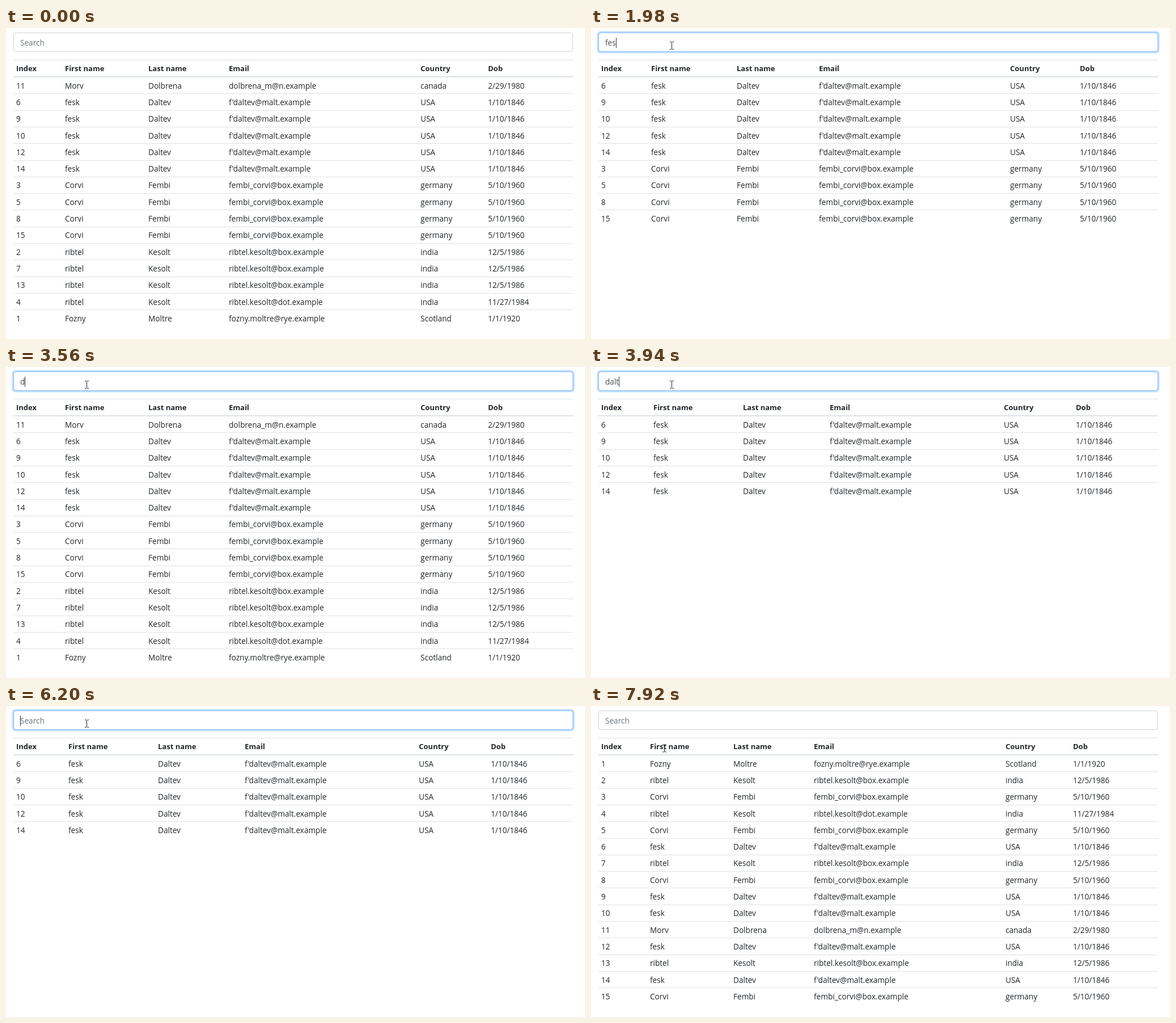
Write an HTML page that moves like this. It is 1021 px wide and 548 px high and loops after 8 s.

```html
<!DOCTYPE html>
<html lang="en">
<head>
<meta charset="utf-8">
<title>Searchable table</title>
<style>
  html, body { margin: 0; width: 100%; height: 100%; overflow: hidden; background: #fff; }
  svg { display: block; width: 100%; height: 100%; }
  text { font: 13.6px "Open Sans", "Noto Sans", sans-serif; fill: #212529; white-space: pre; }
  .head { font-weight: 700; font-size: 13px; }
  .line { fill: #dee2e6; }
  #placeholder { fill: #6c757d; }
  #query { fill: #495057; }
</style>
</head>
<body>
<svg viewBox="0 0 1021 548">
  <rect x="13.5" y="8.5" width="986" height="33" rx="3.5" fill="#fff" stroke="#ced4da"/>
  <g id="focus" fill="none">
    <rect x="12" y="7" width="989" height="36" rx="5" stroke="#bfdeff" stroke-width="3"/>
    <rect x="13.5" y="8.5" width="986" height="33" rx="3.5" stroke="#80bdff"/>
  </g>
  <rect id="selection" x="25" y="16" height="19" fill="#3390ff"/>
  <text id="placeholder" x="25" y="31">Search</text>
  <text id="query" x="25" y="31"></text>
  <rect id="caret" y="17" width="1" height="18" fill="#333"/>
  <g id="table"></g>
  <g id="cursor">
    <path id="arrow" d="M0 0V14.2L3.2 11.2L5.6 16.6L7.8 15.6L5.5 10.4H10Z" fill="#fff" stroke="#000"/>
    <path id="beam" d="M-3.5 -6.5H-1L0 -5.5L1 -6.5H3.5M0 -5.5V5.5M-3.5 6.5H-1L0 5.5L1 6.5H3.5" fill="none" stroke="#222"/>
  </g>
</svg>
<script>
const LOOP = 8000, STEP = 75, ROW = 29.3;
const $ = id => document.getElementById(id);

const headings = ['Index', 'First name', 'Last name', 'Email', 'Country', 'Dob'];
const people = [
  [[11], 'Morv', 'Dolbrena', 'dolbrena_m@n.example', 'canada', '2/29/1980'],
  [[6, 9, 10, 12, 14], 'fesk', 'Daltev', "f'daltev@malt.example", 'USA', '1/10/1846'],
  [[3, 5, 8, 15], 'Corvi', 'Fembi', 'fembi_corvi@box.example', 'germany', '5/10/1960'],
  [[2, 7, 13], 'ribtel', 'Kesolt', 'ribtel.kesolt@box.example', 'india', '12/5/1986'],
  [[4], 'ribtel', 'Kesolt', 'ribtel.kesolt@dot.example', 'india', '11/27/1984'],
  [[1], 'Fozny', 'Moltre', 'fozny.moltre@rye.example', 'Scotland', '1/1/1920']
];
const byLastName = people.flatMap(([ids, ...rest]) => ids.map(id => [id, ...rest]));
const byIndex = [...byLastName].sort((a, b) => a[0] - b[0]);

// Time, text in the field, filter in effect (it follows on key release), selected
const typing = [
  [0, '', ''],
  [1830, 'f', ''], [1905, 'fe', 'f'], [1980, 'fes', 'fe'], [2220, 'fesk', 'fesk'],
  [2770, 'fesk', 'fesk', true], [2845, '', 'fesk'], [2920, '', ''],
  [3560, 'd', ''], [3710, 'da', 'd'], [3790, 'dal', 'da'], [3870, 'dalt', 'dal'],
  [3950, 'dalte', 'dalt'], [4030, 'daltev', 'daltev'],
  [4490, 'daltev', 'daltev', true], [4565, '', 'daltev'], [4640, '', ''],
  [5040, 'u', ''], [5115, 'us', 'u'], [5190, 'usa', 'usa'],
  [5890, 'us', 'us'], [6060, 'u', 'u'], [6200, '', 'u'], [6290, '', '']
];
const caretOn = [[990, 1520], [1830, 3390], [3560, 5740], [6200, 6750]];
const FOCUS = 990, BLUR = 7145, SORT = 7220;

// Start time, number of steps, destination
const moves = [
  [120, 1, 550, 460], [190, 1, 547, 454], [360, 8, 142.5, 31], [6600, 1, 143.5, 31],
  [6750, 3, 63.5, 81.5], [7070, 1, 44.5, 84.5], [7540, 6, 129.5, 74.5]
];

const clamp = v => Math.max(0, Math.min(1, v));
const smooth = p => p * p * (3 - 2 * p);
const fade = (t, start) => smooth(clamp((t - start) / 150));
const show = (id, on) => $(id).setAttribute('visibility', on ? 'visible' : 'hidden');

function columns(count) {
  if (count > 9) return [18, 104, 251, 393, 731, 850];
  if (count > 5) return [18, 106, 257, 402, 739, 862];
  return [18, 110, 268, 421, 728, 855];
}

const line = (y, height = 1) =>
  `<rect class="line" x="13" y="${Math.round(y)}" width="987" height="${height}"/>`;

function tableMarkup(rows) {
  const xs = columns(rows.length);
  const cells = (row, y, cls) => row.map((value, i) =>
    `<text class="${cls}" x="${xs[i]}" y="${Math.round(y)}">${value}</text>`).join('');
  return line(56) + cells(headings, 76, 'head') + line(85, 2) +
    rows.map((row, i) => (i ? line(86 + ROW * i) : '') + cells(row, 106.6 + ROW * i, '')).join('');
}

let tableKey;
function drawTable(filter, sorted) {
  const key = filter + sorted;
  if (key === tableKey) return;
  tableKey = key;
  const rows = (sorted ? byIndex : byLastName)
    .filter(row => row.join(' ').toLowerCase().includes(filter));
  $('table').innerHTML = tableMarkup(rows);
}

function drawField(t, text, selected) {
  $('focus').setAttribute('opacity', fade(t, FOCUS) - fade(t, BLUR));
  $('query').textContent = text;
  $('query').style.fill = selected ? '#fff' : '';
  const width = text ? $('query').getComputedTextLength() : 0;
  $('selection').setAttribute('width', selected ? width : 0);
  $('caret').setAttribute('x', Math.round(25 + width));
  show('placeholder', !text);
  show('caret', !selected && caretOn.some(([on, off]) => t >= on && t < off));
}

function drawCursor(t) {
  let [, , x, y] = moves[0];
  for (const [start, steps, toX, toY] of moves) {
    if (t < start) break;
    const p = smooth(clamp((Math.floor((t - start) / STEP) + 1) / steps));
    x += (toX - x) * p;
    y += (toY - y) * p;
  }
  const visible = t >= moves[0][0];
  const overText = t < 360 || y < 42 || (t > SORT && x > 104);
  $('cursor').setAttribute('transform', `translate(${x} ${y})`);
  show('beam', visible && overText);
  show('arrow', visible && !overText);
}

function draw(now) {
  const t = now % LOOP;
  const [, text, filter, selected] = typing.findLast(([start]) => t >= start);
  drawField(t, text, selected);
  drawTable(filter, t >= SORT);
  drawCursor(t);
}

const begin = performance.now();
function tick() {
  draw(performance.now() - begin);
  requestAnimationFrame(tick);
}
tick();
</script>
</body>
</html>
```
